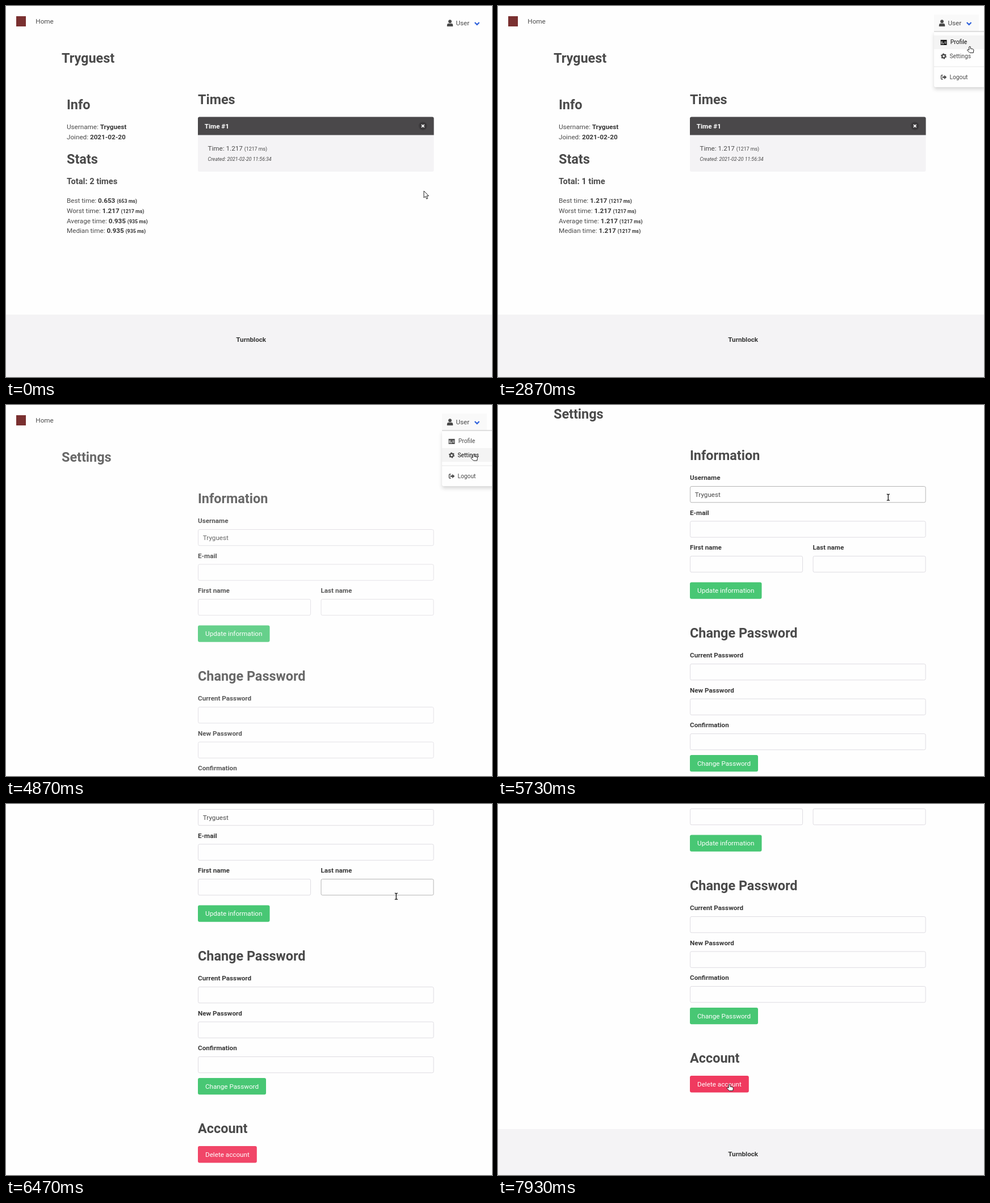
Write an HTML page that moves like this. It is 856 by 654 pixels and loops after 8 s.

```html
<!DOCTYPE html>
<html lang="en">
<head>
<meta charset="utf-8">
<title>Profile and settings</title>
<style>
  html, body { margin: 0; width: 100%; height: 100%; overflow: hidden; background: #fefefe; }
  svg { display: block; width: 856px; height: 654px; font: 11.7px Roboto, sans-serif; fill: #4a4a4a; }
  text { white-space: pre; }
  .title { font-size: 23.4px; font-weight: 700; }
  .sub { font-size: 14.64px; font-weight: 700; }
  .bold { font-weight: 700; fill: #363636; }
  .small { font-size: 8.8px; }
  .item { font-size: 10.25px; }
  .white { fill: #fff; }
  .mid { text-anchor: middle; }
  .field { fill: #fefefe; stroke: #dedce2; }
  .field.on { stroke: #b5b5b5; }
  .green { fill: #48c774; }
  .green.on { fill: #3ec46d; }
  .red { fill: #f14668; }
  .red.on { fill: #f03a5f; }
  .row { fill: none; }
  .row.on { fill: #f4f4f4; }
  .row.on ~ * { fill: #0a0a0a; }
  .line { fill: none; stroke: #4a4a4a; }
  .cursor { fill: #fff; stroke: #222; stroke-linejoin: round; }
</style>
</head>
<body>
<svg id="stage" viewBox="0 0 856 654"></svg>
<script>
const LOOP = 8000, STEP = 200 / 3;
const USER = 'Tryguest', BRAND = 'Turnblock';

const text = (x, y, str, cls = '') => `<text x="${x}" y="${y}" class="${cls}">${str}</text>`;
const rect = (x, y, w, h, fill, r = 0) =>
  `<rect x="${x}" y="${y}" width="${w}" height="${h}" rx="${r}" fill="${fill}"/>`;
const group = (id, body, extra = '') => `<g id="${id}" ${extra}>${body}</g>`;
const bold = str => `<tspan class="bold">${str}</tspan>`;
const small = str => `<tspan class="small">${str}</tspan>`;

// A box that reacts to the pointer and names its pointer shape
const hot = (cls, pointer, x, y, w, h, r = 0) =>
  `<rect class="hot ${cls}" data-pointer="${pointer}" x="${x}" y="${y}" width="${w}" height="${h}" rx="${r}"/>`;

const field = (label, x, y, w) => text(x, y - 10.9, label, 'bold') +
  hot('field', 'beam', x + .5, y + .5, w - 1, 28.3, 2.5);

const button = (label, y, w, cls) => hot(cls, 'hand', 338, y, w, 29.3, 3) +
  text(338 + w / 2, y + 18.7, label, 'white mid');

const stats = (total, rows) => text(107, 313.8, `Total: ${total}`, 'sub') +
  ['Best', 'Worst', 'Average', 'Median'].map((name, i) => {
    const ms = rows[i];
    return text(107, 347.4 + i * 17.56,
      `${name} time: ` + bold(`${(ms / 1000).toFixed(3)} ` + small(`(${ms} ms)`)));
  }).join('');

const row = (x, y, label, icon) => `<g>${hot('row', 'hand', 768, y - 12, 88, 24.4)}` +
  `<g transform="translate(785 ${y + .5})">${icon}</g>${text(x, y + 3.6, label, 'item')}</g>`;

const icons = {
  card: '<path fill-rule="evenodd" d="M-5.5-4.5h11v9h-11zM-4.5-2v5h4.5v-1.5l-1-1v-2.5zM1-1.5h3.5v1h-3.5zM1 .7h3.5v1h-3.5z"/>' +
    '<circle cx="-2.4" cy="-.4" r="1.2"/><path d="M-4.2 2.8q1.8-3 3.6 0z"/>',
  cog: '<circle r="2.8" class="line" stroke-width="2.2"/>' +
    '<circle r="4.3" class="line" stroke-width="1.5" stroke-dasharray="2.25"/>',
  exit: '<path d="M-1.5-3.5h-2q-1 0-1 1v5q0 1 1 1h2" class="line" stroke-width="1.3"/>' +
    '<path d="M-2.5-1.2h3.5v-2.5l4.3 3.7-4.3 3.7v-2.5h-3.5z"/>'
};

const nav = rect(18, 18, 17, 18, '#7a3030') + text(52.3, 31.4, 'Home') +
  group('navHover', rect(768, 15, 79, 30, '#f9f9f9')) +
  '<circle cx="782" cy="27.2" r="2.9"/><path d="M776.8 36v-2q0-3.3 3-3.3h4.4q3 0 3 3.3v2z"/>' +
  text(792.4, 34.4, 'User') +
  '<path d="M825.7 29l3.9 3.9 3.9-3.9" fill="none" stroke="#2f62dc" stroke-width="2.2"/>';

const menu =
  '<path d="M768 45h90v98h-87q-3 0-3-3z" fill="#fefefe" style="filter:drop-shadow(0 4px 3px rgba(10,10,10,.16))"/>' +
  rect(768, 44.2, 88, 1.5, '#d6d6d6') +
  row(796.8, 63.7, 'Profile', icons.card) +
  row(795.5, 88, 'Settings', icons.cog) +
  rect(768, 106.3, 88, 1.2, '#ececec') +
  row(795.5, 125, 'Logout', icons.exit);

const profile = text(98, 99.7, USER, 'title') + text(107, 181.7, 'Info', 'title') +
  text(107, 217.2, 'Username: ' + bold(USER)) +
  text(107, 234.8, 'Joined: ' + bold('2021-02-20')) +
  text(107, 278.4, 'Stats', 'title') +
  group('before', stats('2 times', [653, 1217, 935, 935])) +
  group('after', stats('1 time', Array(4).fill(1217))) +
  text(338, 172.8, 'Times', 'title') +
  rect(338, 195.3, 415.6, 96.7, '#f4f3f5', 3) +
  '<path d="M338 227.5v-29q0-3 3-3h409.6q3 0 3 3v29z" fill="#4a484a"/>' +
  '<text x="349.7" y="215.8" font-weight="700" class="white">Time #1</text>' +
  '<circle cx="734.3" cy="211.5" r="7.3" fill="#3b393b"/>' +
  '<path d="M731.9 209.1l4.8 4.8m0-4.8l-4.8 4.8" stroke="#fff" stroke-width="1.6"/>' +
  text(355.5, 255.4, 'Time: 1.217 ' + small('(1217 ms)')) +
  '<text x="355.5" y="272.7" class="small" font-style="italic">Created: 2021-02-20 11:56:34</text>';

const settings = text(98, 99.7, 'Settings', 'title') +
  text(338, 172.8, 'Information', 'title') +
  field('Username', 338, 219, 415.6) + text(346.8, 237.8, USER) +
  field('E-mail', 338, 280.4, 415.6) +
  field('First name', 338, 341.9, 199) + field('Last name', 554.5, 341.9, 199) +
  button('Update information', 388.4, 126.5, 'green') +
  text(338, 486.2, 'Change Password', 'title') +
  ['Current Password', 'New Password', 'Confirmation']
    .map((label, i) => field(label, 338, 532 + i * 61.5, 415.6)).join('') +
  button('Change Password', 693, 120, 'green') +
  text(338, 790.4, 'Account', 'title') +
  button('Delete account', 813.1, 103.8, 'red');

const footer = rect(0, 0, 856, 130, '#f4f3f5') + text(431.7, 48.4, BRAND, 'bold mid');

const pointers =
  group('arrow', '<path d="M0 0v12l2.8-2.5 2 4.6 2.1-1-2-4.3h3.7z"/>') +
  group('hand', '<path d="M-1.3 6.5v-5.5q1.3-1.8 2.6 0v3.2l4 .7q1.7.4 1.6 2.1l-.7 4.5h-6.3l-4.2-4.2q-.3-1.8 1.4-1.4z"/>') +
  group('beam', '<path d="M-1.5-4.5q2.5 0 2.5 1.5 0-1.5 2.5-1.5M1-3v8M-1.5 6.5q2.5 0 2.5-1.5 0 1.5 2.5 1.5" fill="none" stroke-width="1.4"/>');

document.getElementById('stage').innerHTML =
  group('page', nav + group('profile', profile) + group('settings', settings) +
    group('footer', footer) + group('menu', menu)) +
  group('cursor', pointers, 'class="cursor"');

const el = id => document.getElementById(id);
const show = (id, on) => { el(id).style.display = on ? '' : 'none'; };
const hotspots = [...document.querySelectorAll('.hot')];

const clamp = p => Math.min(1, Math.max(0, p));
const smooth = p => p * p * (3 - 2 * p);
const easeOut = p => 1 - (1 - p) ** 2;

// Pointer moves; a positive sag bends the path downwards
const moves = [
  { from: 70, to: 870, x: 128, y: 290, sag: 250 },
  { from: 870, to: 1130, x: 271, y: 260, sag: 110 },
  { from: 1200, to: 1500, x: 111, y: 330 },
  { from: 1500, to: 2066, x: 773, y: 28, sag: 60 },
  { from: 2066, to: 2860, x: 831, y: 71, sag: -15 },
  { from: 3200, to: 3400, x: 828, y: 66 },
  { from: 3540, to: 3800, x: 823.5, y: 86.5 },
  { from: 5140, to: 5600, x: 686.3, y: 161.8 },
  { from: 6860, to: 7266, x: 454, y: 83 },
  { from: 7400, to: 7930, x: 407.5, y: 494 }
];

function pointerAt(t) {
  let x = 736, y = 326;
  for (const m of moves) {
    const p = smooth(clamp((t - m.from) / (m.to - m.from)));
    x += (m.x - x) * p;
    y += (m.y - y) * p + (m.sag || 0) * Math.sin(Math.PI * p);
  }
  return [x, y];
}

function contains(box, x, y) {
  const [left, top, w, h] = ['x', 'y', 'width', 'height'].map(a => +box.getAttribute(a));
  const slack = 2;
  return x >= left && x <= left + w && y >= top - slack && y <= top + h + slack;
}

function render(t) {
  const [x, y] = pointerAt(t);
  const scroll = Math.round(334 * clamp((t - 5323) / 1815));
  const onSettings = t >= 4690, open = t >= 2130 && t < 5260;

  el('page').setAttribute('transform', `translate(0 ${-scroll})`);
  el('cursor').setAttribute('transform', `translate(${x} ${y})`);
  el('footer').setAttribute('transform', `translate(0 ${onSettings ? 907 : 544})`);

  show('before', t < 195);
  show('after', t >= 195);
  show('profile', !onSettings);
  show('settings', onSettings);
  el('profile').style.opacity = 1 - easeOut(clamp((t - 4390) / 300));
  el('settings').style.opacity = easeOut(clamp((t - 4690) / 300));
  show('menu', open);
  show('navHover', open);

  let pointer = open ? 'hand' : 'arrow';
  for (const box of hotspots) {
    const active = box.closest('#menu') ? open : onSettings;
    const on = active && contains(box, x, y + scroll);
    box.classList.toggle('on', on);
    if (on) pointer = box.dataset.pointer;
  }
  for (const id of ['arrow', 'hand', 'beam']) show(id, id === pointer);
}

const start = performance.now();
function tick() {
  const t = (performance.now() - start) % LOOP;
  // The small lead keeps times just below a step from showing the previous one
  render(Math.floor((t + 10) / STEP) * STEP);
  requestAnimationFrame(tick);
}
tick();
</script>
</body>
</html>
```
